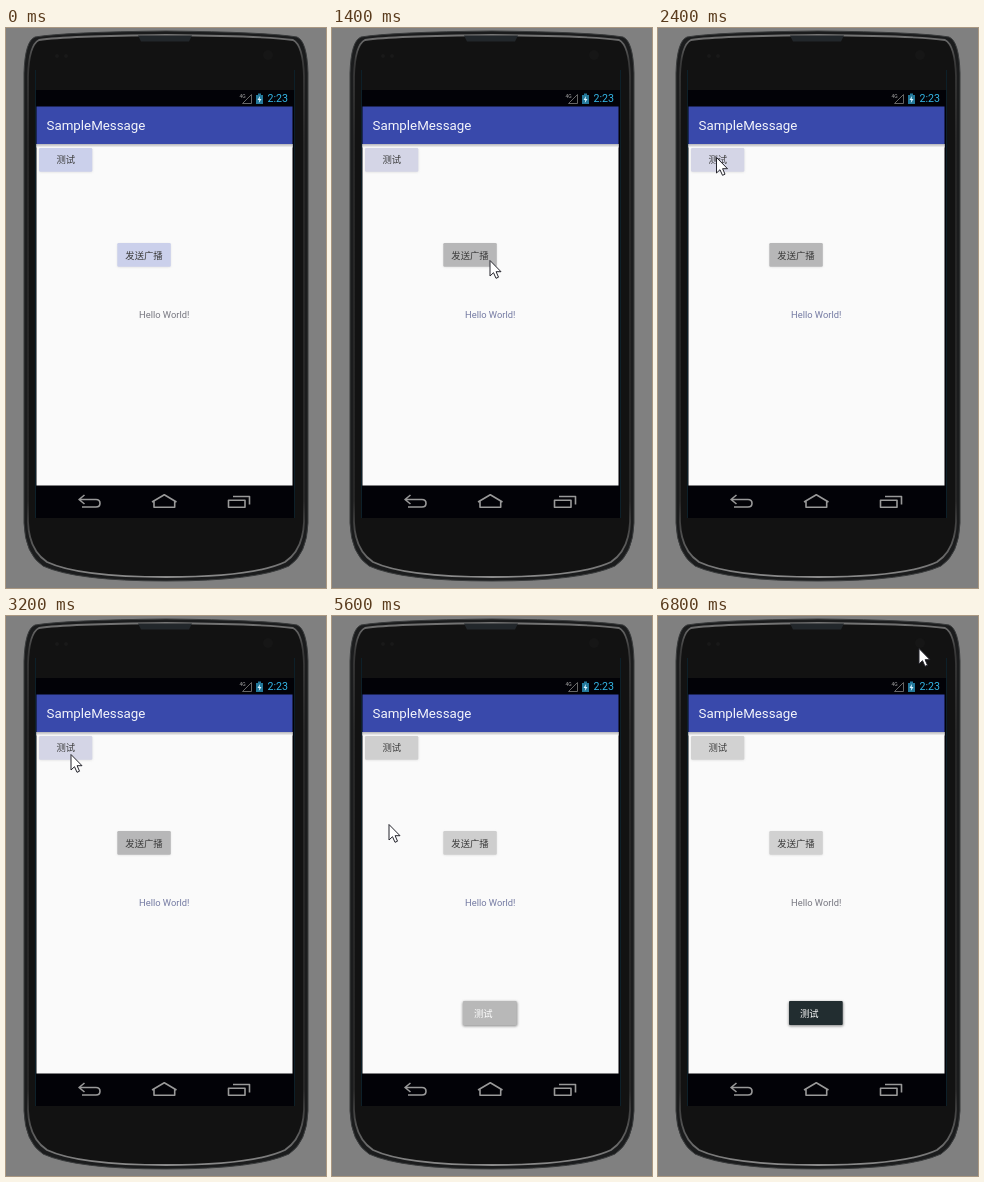
These frames come from a looping animation (320 by 560 pixels, 7 s). An HTML page:

```html
<!DOCTYPE html>
<html lang="zh-CN">
<head>
<meta charset="utf-8">
<title>Phone demo</title>
<style>
  html, body { margin: 0; width: 100%; height: 100%; overflow: hidden; background: #808080; }
  svg { display: block; width: 100vw; height: 100vh; }
  text { font: 9.33px Roboto, "Noto Sans CJK SC", "Noto Sans CJK", sans-serif; }
  .label { text-anchor: middle; fill: #3c3c3c; }
  .title { font-size: 13.33px; fill: #f4f5fb; }
  .clock { font-size: 10.67px; fill: #33b5e5; }
  .icons { fill: none; stroke: #999; stroke-width: 1.6; stroke-linejoin: round; }
</style>
</head>
<body>
<svg viewBox="0 0 320 560" preserveAspectRatio="none">
  <defs>
    <linearGradient id="rim" x2="0" y2="1">
      <stop offset="0" stop-color="#747474"/>
      <stop offset=".05" stop-color="#393939"/>
      <stop offset=".2" stop-color="#282828"/>
      <stop offset=".86" stop-color="#282828"/>
      <stop offset=".96" stop-color="#666"/>
      <stop offset="1" stop-color="#8a8a8a"/>
    </linearGradient>
    <linearGradient id="barShadow" x2="0" y2="1">
      <stop offset="0" stop-color="#b4b4b8"/>
      <stop offset="1" stop-color="#fafafa"/>
    </linearGradient>
    <filter id="soft" x="-20%" y="-30%" width="140%" height="170%">
      <feGaussianBlur stdDeviation="1"/>
    </filter>
  </defs>

  <!-- Phone body -->
  <path fill="#1b1c1d" stroke="#3a3c3d" d="M18 45Q19 13 29 9Q60 4 160 3Q260 4 291 9Q301 13 302 45V495Q301 526 283 538Q250 553 160 553Q70 553 37 538Q19 526 18 495Z"/>
  <path fill="#121212" stroke="url(#rim)" stroke-width="1.8" d="M22 48Q23 17 33 12Q60 8 160 7Q260 8 287 12Q297 17 298 48V494Q297 522 279 534Q247 549 160 549Q73 549 41 534Q23 522 22 494Z"/>
  <path fill="none" stroke="#0d2029" d="M29.500 42V490M288.500 42V490"/>
  <path d="M132 7.500H186L183 13.500H135Z" fill="#22272b"/>
  <circle cx="262" cy="27" r="5" fill="#161616"/>
  <circle cx="51" cy="28" r="2" fill="#191919"/>
  <circle cx="60" cy="28" r="2" fill="#191919"/>

  <!-- Screen -->
  <rect x="30" y="62" width="258" height="428" fill="#020207"/>
  <rect x="30.500" y="78.500" width="256" height="37.500" fill="#3949ab"/>
  <rect x="30.500" y="116" width="256" height="341.500" fill="#fafafa"/>
  <rect x="30.500" y="116" width="256" height="3.500" fill="url(#barShadow)"/>
  <text class="title" x="40.500" y="102.300">SampleMessage</text>

  <!-- Status bar -->
  <text x="233.500" y="70" fill="#aaa" style="font-size:5px">4G</text>
  <path d="M236.500 75.500H245.500V66.500Z" fill="none" stroke="#666"/>
  <path d="M250 67H252V65.500H255V67H257V76H250Z" fill="#24799b"/>
  <path d="M254 68L251.500 72H253.300L252.800 75L255.500 71H253.700Z" fill="#d8f3ff"/>
  <text class="clock" x="261.500" y="74.300">2:23</text>

  <!-- Content -->
  <g id="test">
    <rect x="33.300" y="120.800" width="53" height="23.500" rx="1.300" fill="#aaa" filter="url(#soft)" opacity=".35"/>
    <rect class="face" x="33" y="120" width="53.300" height="23.800" rx="1.300"/>
    <text class="label" x="59.800" y="135.300">测试</text>
  </g>
  <g id="send">
    <rect x="111.500" y="215.800" width="53" height="23.500" rx="1.300" fill="#aaa" filter="url(#soft)" opacity=".35"/>
    <rect class="face" x="111.300" y="215" width="53.500" height="23.800" rx="1.300"/>
    <text class="label" x="138" y="230.500">发送广播</text>
  </g>
  <text id="hello" x="158.200" y="290" text-anchor="middle">Hello World!</text>
  <g id="toast">
    <rect x="130.500" y="385.500" width="55" height="25" rx="2" fill="#999" filter="url(#soft)"/>
    <rect class="face" x="131" y="385" width="53.700" height="24" rx="1"/>
    <text x="142" y="400.500" fill="#fff">测试</text>
  </g>

  <!-- Navigation bar -->
  <g class="icons">
    <path d="M78.500 467L73 471.500L78.500 476M73 471.500H90Q94 471.500 94 475.200T90 479H76"/>
    <path d="M146 474L158.300 466.800L170.500 474M148 473.300V479.300H168.700V473.300"/>
    <path d="M222.500 472.200H239V479.300H222.500ZM227 468.500H243.500V476.500"/>
  </g>

  <path id="cursor" fill="#fff" stroke="#24242c" d="M.5.5V16L4 12.700L6.500 18.300L9 17.200L6.600 11.700H11.500Z"/>
</svg>

<script>
const LOOP = 7000, STEP = 200;
const find = selector => document.querySelector(selector);
const cursor = find('#cursor'), toast = find('#toast'), hello = find('#hello');

// [time, x, y]
const route = [
  [200, 226, 322], [600, 157.500, 232], [1400, 157.500, 232],
  [1800, 104.500, 183], [2400, 58, 129], [2600, 62, 128],
  [3000, 62, 128], [3200, 64.500, 138], [3600, 64.500, 138],
  [4200, 56.500, 208], [5600, 56.500, 208], [6400, 270, 110],
  [6600, 267, 76], [6800, 260.500, 32]
];

// [time, test button, send button, greeting]
const shades = [
  [0, '#cbd0eb', '#cbd0eb', '#777780'],
  [400, '#d2d2d2', '#d1d1d1', '#777780'],
  [1400, '#d4d5e6', '#b7b7b8', '#747aa2'],
  [5600, '#cfcfcf', '#cecece', '#747aa2'],
  [5800, '#d2d2d2', '#d1d1d1', '#777780']
];

function positionAt(t) {
  const next = route.findIndex(point => point[0] >= t);
  if (next <= 0) return route[0].slice(1);
  const [t0, x0, y0] = route[next - 1], [t1, x1, y1] = route[next];
  const k = (t - t0) / (t1 - t0);
  return [x0 + (x1 - x0) * k, y0 + (y1 - y0) * k];
}

function show(element, visible) {
  element.style.display = visible ? '' : 'none';
}

function render(t) {
  const [, test, send, greeting] = shades.filter(shade => shade[0] <= t).pop();
  find('#test .face').style.fill = test;
  find('#send .face').style.fill = send;
  hello.style.fill = greeting;
  show(cursor, t >= route[0][0]);
  cursor.setAttribute('transform', `translate(${positionAt(t)})`);
  show(toast, t >= 5600);
  find('#toast .face').style.fill = t < 5800 ? '#b8b8b8' : '#222d30';
}

function tick() {
  const t = performance.now() % LOOP;
  render(Math.floor(t / STEP) * STEP);
  requestAnimationFrame(tick);
}
tick();
</script>
</body>
</html>
```
